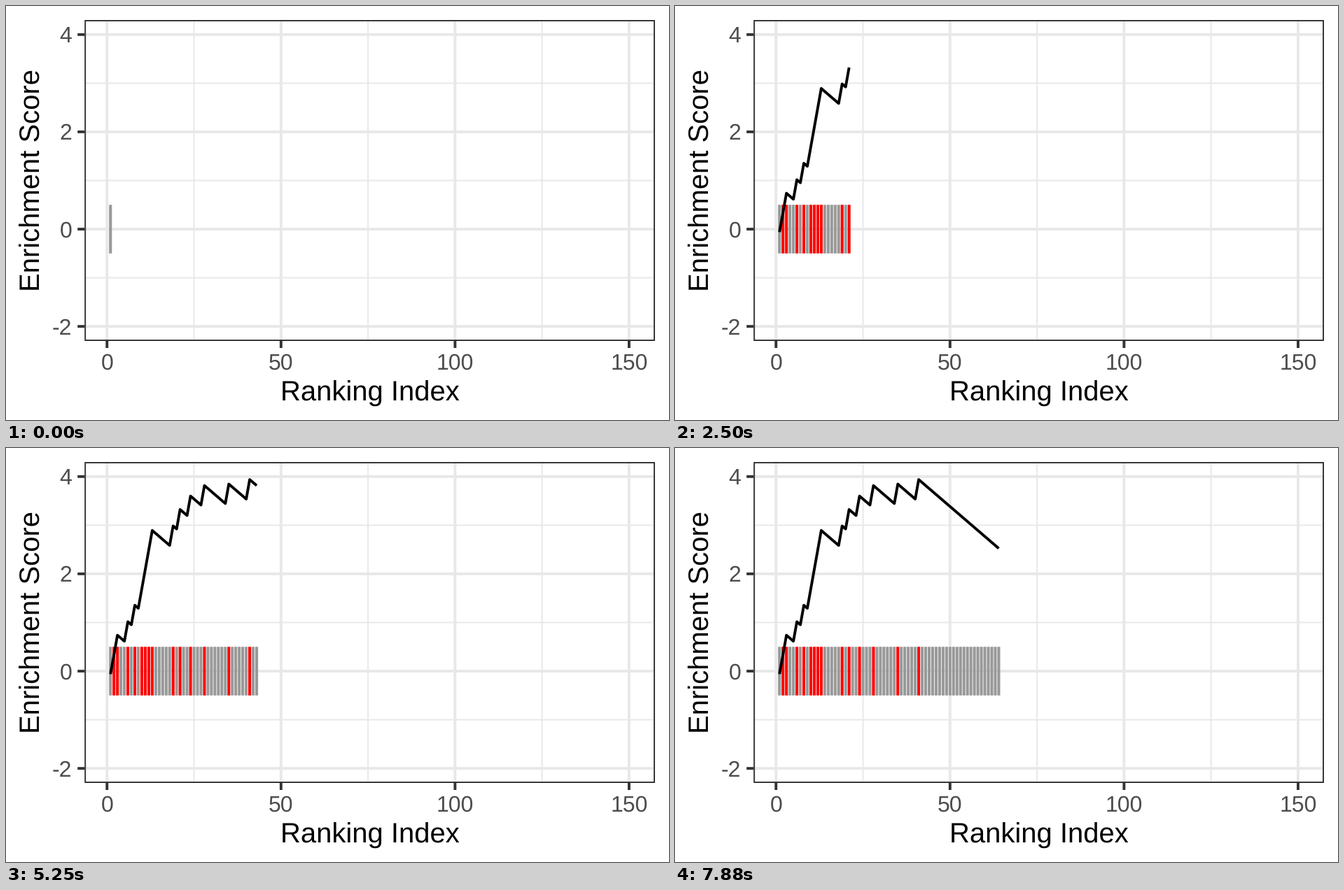
Animation of 947x592 px, one loop 8 s. Source, as a matplotlib script:

```python
import matplotlib.pyplot as plt
import numpy as np
from matplotlib.animation import FuncAnimation
from matplotlib.collections import LineCollection
from matplotlib.patches import Rectangle

W, H, DPI = 947, 592, 64
PT = 72 / DPI  # points per pixel
LEFT, RIGHT, TOP, BOTTOM = 112.2, 927, 20, 479
XMIN, XMAX, YMIN, YMAX = -6.45, 157.45, -2.3, 4.3
GRID, DARK, LABEL = "#e8e8e8", "#333333", "#4d4d4d"
FRAMES, STEP_MS = 64, 125

plt.rcParams["font.family"] = "Liberation Sans"
plt.rcParams["text.hinting"] = "none"


def px(x):
    return LEFT + (x - XMIN) / (XMAX - XMIN) * (RIGHT - LEFT)


def py(y):
    return BOTTOM - (y - YMIN) / (YMAX - YMIN) * (BOTTOM - TOP)


fig = plt.figure(figsize=(W / DPI, H / DPI), dpi=DPI, facecolor="white")
ax = fig.add_axes([0, 0, 1, 1])
ax.set(xlim=(0, W), ylim=(H, 0))
ax.axis("off")


def stroke(xs, ys, width, color, z):
    return ax.plot(xs, ys, lw=width * PT, color=color, zorder=z, snap=False,
                   solid_capstyle="butt", solid_joinstyle="round")[0]


def label(x, y, text, size, color, **kw):
    ax.text(x, y, text, fontsize=size * PT, color=color, **kw)


def grid_x(value, width, z):
    stroke([px(value)] * 2, [TOP, BOTTOM], width, GRID, z)


def grid_y(value, width, z):
    stroke([LEFT, RIGHT], [py(value)] * 2, width, GRID, z)


# Grid, ticks and labels
for v in (25, 75, 125):
    grid_x(v, 1.94, 1)
for v in (-1, 1, 3):
    grid_y(v, 1.94, 1)
for v in (0, 50, 100, 150):
    grid_x(v, 3.88, 2)
    stroke([px(v)] * 2, [BOTTOM, BOTTOM + 10], 3.88, DARK, 6)
    label(px(v), 520, str(v), 32, LABEL, ha="center", va="baseline")
for v in (-2, 0, 2, 4):
    grid_y(v, 3.88, 2)
    stroke([LEFT - 10, LEFT], [py(v)] * 2, 3.88, DARK, 6)
    label(LEFT - 18, py(v) + 11.4, str(v), 32, LABEL, ha="right", va="baseline")

ax.add_patch(Rectangle((LEFT + 0.97, TOP + 0.97), RIGHT - LEFT - 1.94,
                       BOTTOM - TOP - 1.94, fill=False, ec=DARK,
                       lw=1.94 * PT, zorder=6, snap=False))
label((LEFT + RIGHT) / 2, 565, "Ranking Index", 40, "black",
      ha="center", va="baseline")
label(48.3, (TOP + BOTTOM) / 2, "Enrichment Score", 40, "black", rotation=90,
      rotation_mode="anchor", ha="center", va="baseline")

# Running score: 20 hits among 150 ranks, scaled by 8
HITS = [2, 3, 6, 8, 10, 11, 12, 13, 19, 21, 24, 28, 35, 41]
rank = np.arange(1, FRAMES + 1)
is_hit = np.isin(rank, HITS)
score = np.cumsum(np.where(is_hit, 8 / 20, -8 / 130))

xs, ys = px(rank), py(score)
bars = [[(x, py(-0.5)), (x, py(0.5))] for x in xs]
colors = np.where(is_hit, "#ff0000", "#999999")

ticks = LineCollection([], linewidths=4.1 * PT, zorder=3, snap=False,
                       capstyle="butt")
ax.add_collection(ticks, autolim=False)
curve = stroke([], [], 3.9, "black", 4)


def update(i):
    n = i + 1
    ticks.set_segments(bars[:n])
    ticks.set_color(list(colors[:n]))
    curve.set_data(xs[:n], ys[:n])
    return ticks, curve


anim = FuncAnimation(fig, update, frames=FRAMES, interval=STEP_MS,
                     init_func=lambda: update(0), repeat=True, repeat_delay=0)
plt.show()
```
